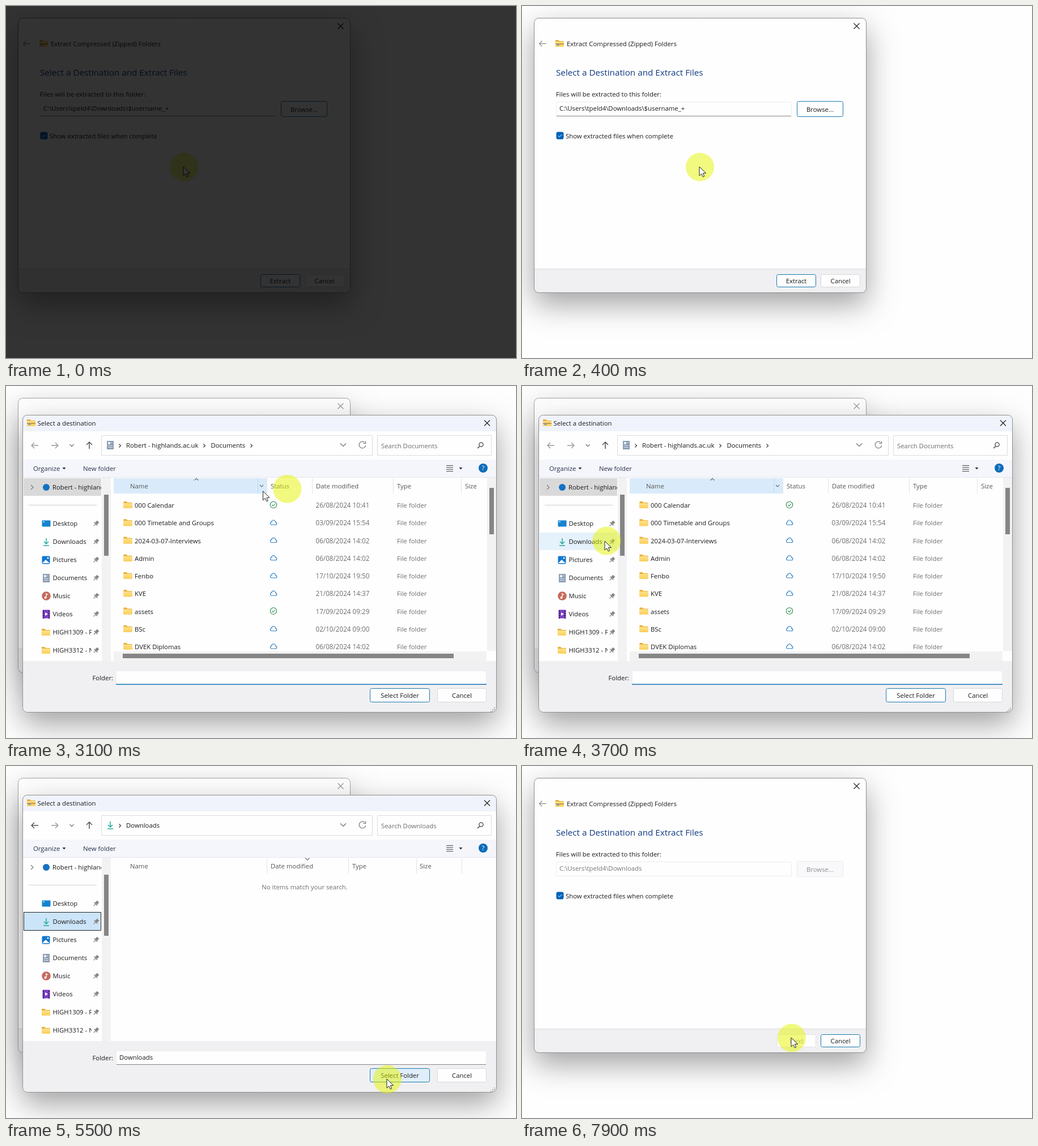
An HTML page with a canvas for the animation above (8000 ms loop, 900 by 622 pixels).

```html
<!DOCTYPE html>
<html lang="en">
<head>
<meta charset="utf-8">
<title>Extract files</title>
<style>
html, body { margin: 0; width: 100%; height: 100%; overflow: hidden; background: #fefefe; }
canvas { display: block; }
</style>
</head>
<body>
<canvas width="900" height="622"></canvas>
<script>
const g = document.querySelector('canvas').getContext('2d');
const INK = '#1b1b1b', GREY = '#6e6e6e', BLUE = '#1c7aae', WHITE = '#fefefe', RULE = '#e3e3e6';
const LOOP = 8000, STEP = 100, LAG = 85;

// Times of events in ms
const BROWSE = 1900, OPEN = 2500, LOADED = 2800, PICK = 3900, SELECT = 5700, CLOSE = 5900, EXTRACT = 7700;
// start, end, x, y, bend of the path
const moves = [
  [1000, 1800, 519, 180, 1],
  [2900, 3650, 146, 274, 1.6],
  [4400, 5400, 672, 553, 1.6],
  [6050, 7600, 475, 480, 2.5]
];

function pointer(t) {
  let x = 313, y = 284;
  for (const [start, end, toX, toY, bend] of moves) {
    const u = Math.min(1, Math.max(0, (t - start) / (end - start)));
    const s = u * u * (3 - 2 * u);
    x += (toX - x) * s;
    y += (toY - y) * s ** bend;
  }
  return [x, y];
}

function text(s, x, y, color = INK, size = 11.35, align = 'left') {
  g.font = `${size}px "Open Sans", "Noto Sans", sans-serif`;
  g.textAlign = align;
  g.fillStyle = color;
  g.fillText(s, x, y + size * 0.36);
}

function rect(x, y, w, h, fill) {
  g.fillStyle = fill;
  g.fillRect(x, y, w, h);
}

function box(x, y, w, h, fill, stroke, r = 0) {
  g.beginPath();
  g.roundRect(x + 0.5, y + 0.5, w - 1, h - 1, r);
  g.fillStyle = fill;
  g.fill();
  if (!stroke) return;
  g.lineWidth = 1;
  g.strokeStyle = stroke;
  g.stroke();
}

function line(color, width, ...p) {
  g.beginPath();
  for (let i = 0; i < p.length; i += 2) g.lineTo(p[i], p[i + 1]);
  g.strokeStyle = color;
  g.lineWidth = width;
  g.stroke();
}

function shape(fill, ...p) {
  g.beginPath();
  for (let i = 0; i < p.length; i += 2) g.lineTo(p[i], p[i + 1]);
  g.closePath();
  g.fillStyle = fill;
  g.fill();
}

function arc(x, y, r, color, width, from = 0, to = 7) {
  g.beginPath();
  g.arc(x, y, r, from, to);
  if (width) {
    g.lineWidth = width;
    g.strokeStyle = color;
    g.stroke();
  } else {
    g.fillStyle = color;
    g.fill();
  }
}

function clipped(x, y, w, h, draw) {
  g.save();
  g.beginPath();
  g.rect(x, y, w, h);
  g.clip();
  draw();
  g.restore();
}

function panel(x, y, w, h, active) {
  g.save();
  g.shadowColor = `rgba(0,0,0,${active ? 0.37 : 0.24})`;
  g.shadowBlur = 52;
  g.shadowOffsetY = active ? 20 : 18;
  box(x, y, w, h, WHITE, null, 8);
  g.restore();
}

function frame(x, y, w, h, color) {
  box(x, y, w, h, 'transparent', color, 8);
}

function button(label, x, y, w, h, border = BLUE, fill = WHITE, color = INK) {
  box(x, y, w, h, fill, border, 3);
  text(label, x + w / 2, y + h / 2 + 0.5, color, 11.35, 'center');
}

function cross(x, y, color) {
  line(color, 1.1, x - 5, y - 5, x + 5, y + 5);
  line(color, 1.1, x + 5, y - 5, x - 5, y + 5);
}

function arrow(x, y, dx, dy, color) {
  line(color, 1.3, x - 6 * dx, y - 6 * dy, x + 6 * dx, y + 6 * dy);
  chevron(x + 3.5 * dx, y + 3.5 * dy, dx, dy, 5, color);
}

function chevron(x, y, dx, dy, size = 4, color = '#6a6a6a') {
  const h = size / 2;
  line(color, 1.1,
    x - dx * h - dy * size, y - dy * h - dx * size,
    x + dx * h, y + dy * h,
    x - dx * h + dy * size, y - dy * h + dx * size);
}

function folder(x, y, zipped) {
  shape('#e8b038', x, y, x + 5, y, x + 7, y + 2, x + 15, y + 2, x + 15, y + 12, x, y + 12);
  const body = g.createLinearGradient(0, y, 0, y + 12);
  body.addColorStop(0, '#ffe69a');
  body.addColorStop(1, '#fbd05c');
  rect(x, y + 3, 15, 9, body);
  if (!zipped) return;
  rect(x, y + 6, 15, 2, '#c2963a');
  rect(x + 2, y + 7, 5, 3, '#98a0a6');
}

function download(x, y) {
  line('#12a594', 1.4, x, y - 6, x, y + 4);
  line('#12a594', 1.4, x - 4, y, x, y + 4, x + 4, y);
  line('#12a594', 1.4, x - 5, y + 7, x + 5, y + 7);
}

function page(x, y) {
  rect(x - 6, y - 7, 12, 15, '#8c9db4');
  rect(x - 4, y - 5, 4, 4, '#e8f0f8');
  for (const dy of [-4, 1, 4]) line('#dfe7f0', 1, x + (dy < 0 ? 1 : -4), y + dy + 0.5, x + 4, y + dy + 0.5);
}

function cloud(x, y) {
  g.beginPath();
  g.arc(x - 3, y + 1.5, 2.5, Math.PI / 2, Math.PI * 1.5);
  g.arc(x, y - 0.5, 3.6, Math.PI * 1.1, Math.PI * 1.9);
  g.arc(x + 3.5, y + 1.7, 2.3, Math.PI * 1.5, Math.PI / 2);
  g.closePath();
  g.strokeStyle = '#2b7fc4';
  g.lineWidth = 1.1;
  g.stroke();
}

function check(x, y) {
  arc(x, y, 5.7, '#2c8a4b', 1.1);
  line('#2c8a4b', 1.1, x - 2.6, y, x - 0.7, y + 2, x + 2.8, y - 2);
}

function pin(x, y) {
  g.save();
  g.translate(x, y);
  g.rotate(Math.PI / 4);
  rect(-2.5, -5, 5, 5, '#858585');
  rect(-4, 0, 8, 1.6, '#858585');
  line('#858585', 1.2, 0, 1, 0, 6);
  g.restore();
}

const places = [
  ['Desktop', (x, y) => { box(x - 8, y - 6, 16, 12, '#1583cf', null, 1); rect(x - 6, y - 4, 3, 2, '#7fe0f5'); }],
  ['Downloads', download],
  ['Pictures', (x, y) => {
    box(x - 8, y - 7, 15, 15, '#1277d0', null, 2);
    shape('#fff', x - 7, y + 6, x - 1, y, x + 6, y + 6);
    arc(x + 3, y - 3, 1.5, '#fff');
  }],
  ['Documents', page],
  ['Music', (x, y) => {
    arc(x, y, 7.8, '#c56a5c');
    line('#fff', 1.4, x, y + 3, x, y - 4, x + 3, y - 2);
    arc(x - 1.5, y + 3, 2, '#fff');
  }],
  ['Videos', (x, y) => {
    box(x - 7, y - 8, 14, 16, '#7b3fc4', null, 1);
    for (let i = -6; i < 7; i += 4) { rect(x - 6, y + i, 2, 2, '#33145c'); rect(x + 4, y + i, 2, 2, '#33145c'); }
    shape('#fff', x - 2, y - 3, x + 3, y, x - 2, y + 3);
  }],
  ['HIGH1309 - F', (x, y) => folder(x - 8, y - 6)],
  ['HIGH3312 - N', (x, y) => folder(x - 8, y - 6)]
];

const files = [
  ['000 Calendar', '26/08/2024 10:41', true],
  ['000 Timetable and Groups', '03/09/2024 15:54'],
  ['2024-03-07-Interviews', '06/08/2024 14:02'],
  ['Admin', '06/08/2024 14:02'],
  ['Fenbo', '17/10/2024 19:50'],
  ['KVE', '21/08/2024 14:37'],
  ['assets', '17/09/2024 09:29', true],
  ['BSc', '02/10/2024 09:00'],
  ['DVEK Diplomas', '06/08/2024 14:02']
];

function wizard(t, x, y) {
  const active = t < BROWSE + 100 || t >= CLOSE;
  const done = t >= EXTRACT;
  panel(21, 21, 587, 486, active);
  g.fillStyle = '#f0f0f3';
  g.beginPath();
  g.roundRect(22, 464, 585, 42, [0, 0, 7, 7]);
  g.fill();
  rect(22, 464, 585, 1, '#dddde2');
  frame(21, 21, 587, 486, active ? '#8f8f8f' : '#a2a2a2');

  cross(590.5, 35.5, active ? INK : '#949494');
  arrow(36.5, 66.5, -1, 0, '#8a8a8a');
  folder(59, 60, true);
  text('Extract Compressed (Zipped) Folders', 79, 67);
  text('Select a Destination and Extract Files', 60, 117.5, '#103a80', 15.25);
  text('Files will be extracted to this folder:', 60, 155.5);

  box(60, 169, 416, 26, WHITE, '#ececee', 2);
  if (!done) rect(61, 194, 414, 1, '#858585');
  text('C:\\Users\\tpeld4\\Downloads' + (t < CLOSE ? '\\$username_+' : ''), 66, 181, done ? '#777' : INK);

  const over = t >= 1700 && t < OPEN;
  if (done) button('Browse...', 485, 168, 82, 28, '#e9e9ec', '#f9f9fb', '#8f8f8f');
  else button('Browse...', 485, 168, 82, 28, over ? '#0f5a94' : BLUE, t >= BROWSE && t < CLOSE ? '#cce4f7' : over ? '#e0eef9' : WHITE);

  box(60, 222, 14, 14, '#0062b8', null, 3);
  line('#fff', 1, 63.5, 229, 66, 231.5, 70.5, 227);
  text('Show extracted files when complete', 77, 230);

  const onExtract = x > 449 && x < 519 && y > 474 && y < 497;
  if (done) button('Next', 450, 474, 69, 23, '#e3e3e6', WHITE, '#8f8f8f');
  else button('Extract', 449, 474, 70, 23, BLUE, onExtract ? '#e0eef9' : WHITE);
  button('Cancel', 527, 474, 70, 23, done ? BLUE : '#d8d8dc');
}

function sidebar(t, downloads) {
  rect(169, 162, 16, 324, '#f2f2f3');
  rect(173, 192, 8, 108, '#858585');
  if (!downloads) rect(31, 163, 137, 31, '#d9d9d9');
  chevron(46, 179, 1, 0, 4, '#777');
  arc(71, 179, 6, '#1372c4');
  clipped(31, 163, 137, 31, () => text('Robert - highlands.ac.uk', 82, 179));
  rect(40, 210, 120, 1, '#cfcfcf');
  if (downloads) box(31, 258, 137, 33, '#cce4f8', '#222');
  else if (t >= 3600) rect(31, 259, 137, 31, '#e5f1fb');
  places.forEach(([name, icon], i) => {
    const y = 243 + 32 * i;
    icon(71, y);
    clipped(80, y - 12, 71, 24, () => text(name, 82.5, y));
    pin(159, y);
  });
}

function columns(list, dividers) {
  for (const [label, x] of list) text(label, x, 177, '#555');
  for (const x of dividers) rect(x, 163, 1, 27, RULE);
}

function documents() {
  rect(190, 163, 270, 27, '#d9ebfa');
  rect(444, 163, 1, 27, '#b9d8f0');
  chevron(336, 165, 0, -1, 3.5);
  chevron(451, 176.5, 0, 1, 3);
  columns([['Name', 219], ['Status', 467], ['Date modified', 547], ['Type', 690], ['Size', 810]], [460, 540, 683, 803]);
  files.forEach(([name, date, synced], i) => {
    const y = 211 + 31.25 * i;
    folder(207.5, y - 7);
    text(name, 227, y);
    (synced ? check : cloud)(472, y - 1);
    text(date, 546.5, y, GREY, 11.7);
    text('File folder', 690, y, GREY);
  });
  rect(849, 162, 16, 306, '#f2f2f3');
  rect(853, 180, 8, 82, '#858585');
  rect(190, 469, 658, 17, '#f2f2f3');
  rect(206, 473, 584, 8, '#858585');
}

function emptyList() {
  columns([['Name', 219], ['Date modified', 467], ['Type', 611], ['Size', 730]], [460, 604, 724, 804]);
  chevron(532, 164.5, 0, 1, 3.5);
  text('No items match your search.', 527, 214, GREY, 11.35, 'center');
}

function picker(t, x, y) {
  const downloads = t >= PICK + 100;
  const place = downloads ? 'Downloads' : 'Documents';
  panel(29, 51, 837, 526, true);
  g.save();
  g.beginPath();
  g.roundRect(29, 51, 837, 526, 8);
  g.clip();
  rect(29, 51, 837, 29, '#f0f3fb');
  rect(29, 130, 837, 32, '#f5f6fb');
  rect(29, 161, 837, 1, '#e6e7ec');
  rect(29, 486, 837, 91, '#f0f0f3');
  g.restore();
  frame(29, 51, 837, 526, '#8f8f8f');

  folder(37, 59, true);
  text('Select a destination', 55.5, 66);
  cross(849, 65.5, INK);

  arrow(51, 105, -1, 0, downloads ? '#333' : '#8a8a8a');
  arrow(86, 105, 1, 0, '#8a8a8a');
  chevron(116, 105, 0, 1, 3.5);
  arrow(147, 105, 0, -1, '#333');
  box(168, 87, 479, 36, WHITE, '#dcdce0');
  chevron(201, 105.5, 1, 0, 3, '#333');
  if (downloads) {
    download(184, 104);
    text(place, 212, 105);
  } else {
    page(184, 104);
    text('Robert - highlands.ac.uk', 212, 105);
    chevron(350, 105.5, 1, 0, 3, '#333');
    text(place, 361.5, 105);
    chevron(433, 105.5, 1, 0, 3, '#333');
  }
  chevron(595, 104, 0, 1, 5);
  arc(629, 104, 5.8, '#666', 1.1, 0.2, 5.4);
  line('#666', 1.1, 634.5, 97.5, 634.5, 101.5, 630.5, 101.5);
  box(655, 87, 202, 36, WHITE, '#dcdce0');
  text('Search ' + place, 662, 105.5, GREY);
  arc(838.5, 103.5, 3.6, '#444', 1.3);
  line('#444', 1.5, 836, 106.5, 832, 110);

  text('Organize', 48, 146, '#26304a');
  shape('#26304a', 99.5, 144, 105.5, 144, 102.5, 147.5);
  text('New folder', 136, 146, '#26304a');
  for (let i = 0; i < 4; i++) rect(777, 140 + i * 3.4, 12, 1, '#444');
  shape('#26304a', 799.5, 144, 805.5, 144, 802.5, 147.5);
  arc(842, 145, 8, '#0b6cba');
  text('?', 842, 145, '#fff', 11.5, 'center');

  sidebar(t, downloads);
  if (downloads) emptyList();
  else if (t >= LOADED) documents();

  text('Folder:', 152.5, 516);
  box(194, 503, 654, 25, WHITE, '#ededf0', 2);
  if (downloads) {
    rect(195, 527, 652, 1, '#858585');
    text('Downloads', 200, 515);
  } else rect(194, 526.5, 654, 1.5, '#1572b4');
  const over = x > 642 && x < 747 && y > 535 && y < 559;
  button('Select Folder', 642, 534, 106, 25, BLUE, t >= SELECT ? '#cce4f7' : over ? '#e0eef9' : WHITE);
  button('Cancel', 761, 534, 87, 25, '#d8d8dc');
  for (let i = 0; i < 3; i++)
    for (let j = 0; j <= i; j++) rect(861 - 3 * j, 568 + 3 * i, 2, 2, '#b5b5b5');
}

function cursor(t, x, y) {
  const [cx, cy] = pointer(t - LAG);
  arc(cx + 1, cy + 0.5, 25, 'rgba(229,245,0,0.5)');
  if (t >= BROWSE + 100 && t < LOADED) {
    const a = t / 160;
    arc(x, y - 0.5, 7.2, '#1d84dc', 4.2);
    arc(x, y - 0.5, 7.2, '#54b4f2', 4.2, a, a + 2);
    return;
  }
  g.save();
  g.translate(x, y);
  shape('#fff', 0, 0, 0, 16, 3.8, 12.6, 6.3, 18, 8.8, 16.9, 6.4, 11.6, 11.5, 11.4);
  g.strokeStyle = '#222';
  g.lineWidth = 1;
  g.stroke();
  g.restore();
}

function draw(now) {
  const t = Math.floor(now % LOOP / STEP) * STEP;
  const [x, y] = pointer(t);
  rect(0, 0, 900, 622, WHITE);
  wizard(t, x, y);
  if (t >= OPEN && t < CLOSE) picker(t, x, y);
  cursor(t, x, y);
  const dark = Math.max(0, 0.8 - t / 500);
  if (dark) rect(0, 0, 900, 622, `rgba(0,0,0,${dark})`);
}

const begin = performance.now();
function tick() {
  draw(performance.now() - begin);
  requestAnimationFrame(tick);
}
tick();
</script>
</body>
</html>
```
